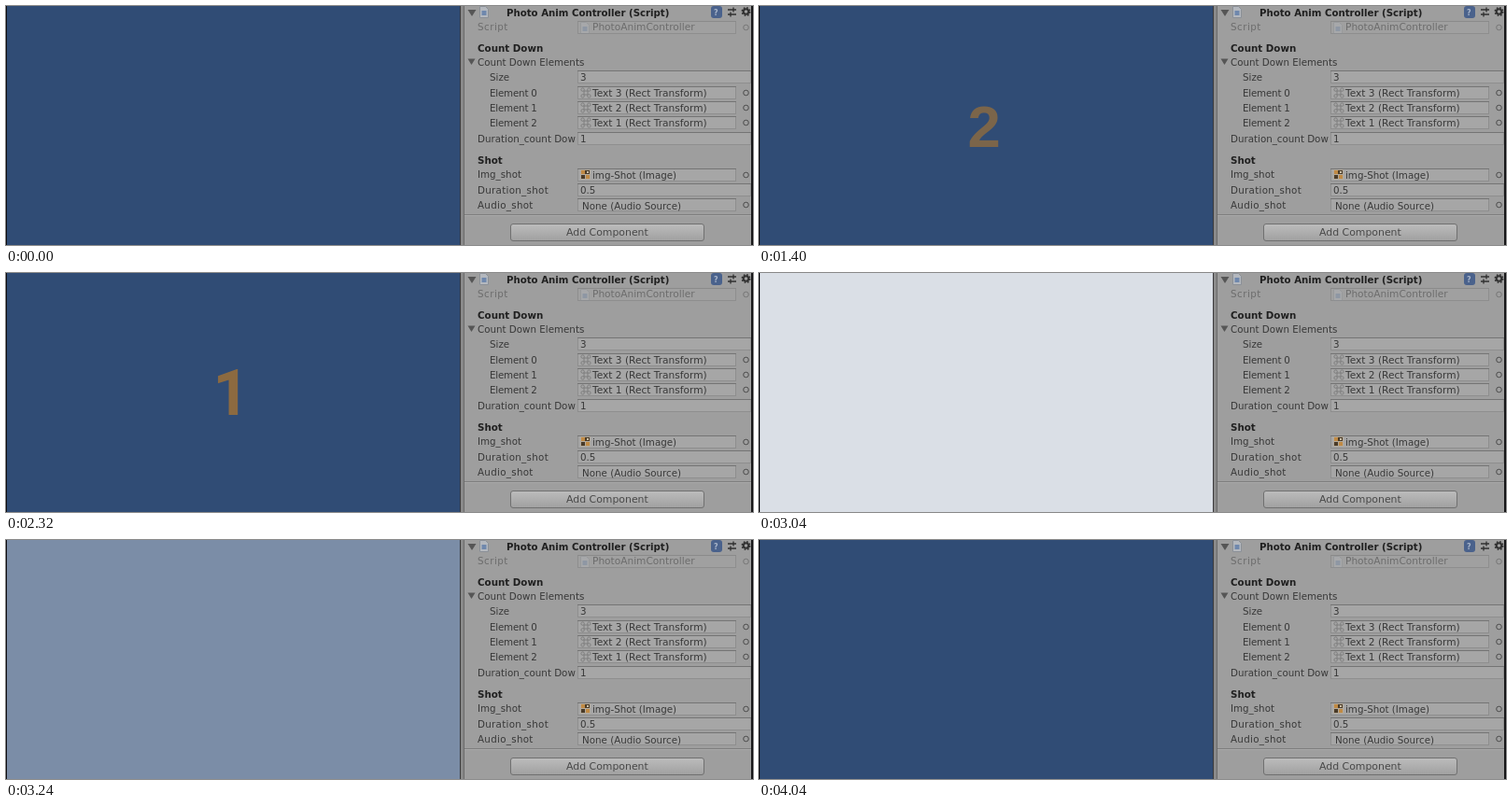
Animation, 800 px wide and 256 px high, one loop 4440 ms. Source, as an HTML page:

```html
<!DOCTYPE html>
<html lang="en">
<head>
<meta charset="utf-8">
<title>Photo countdown</title>
<style>
  html, body { margin: 0; width: 100%; height: 100%; overflow: hidden; background: #0c0c10; }
  svg { display: block; width: 800px; height: 256px; }
  text { font: 10.3px "DejaVu Sans", Verdana, sans-serif; fill: #383838; white-space: pre; }
  .bold { font-weight: bold; fill: #202020; }
  .dim { fill: #6c6c6c; }
  .wide { font-size: 10.6px; }
  #digit { font-weight: bold; fill: #ff9100; text-anchor: middle; }
</style>
</head>
<body>
<svg id="stage" viewBox="0 0 800 256">
  <defs>
    <linearGradient id="face" x2="0" y2="1">
      <stop stop-color="#bcbcbc"/><stop offset="1" stop-color="#a0a0a0"/>
    </linearGradient>
    <g id="rectIcon" fill="none" stroke="#7a7a7a" stroke-width=".9">
      <path d="M4 4h4v4h-4z"/>
      <circle cx="2.6" cy="2.6" r="1.7"/><circle cx="9.4" cy="2.6" r="1.7"/>
      <circle cx="2.6" cy="9.4" r="1.7"/><circle cx="9.4" cy="9.4" r="1.7"/>
    </g>
    <g id="page">
      <path d="M.5 .5h6l3 3v9h-9z" fill="#b4b8be" stroke="#8b9097"/>
      <rect x="2.500" y="5" width="5" height="5" fill="#6f88ad"/>
    </g>
  </defs>
  <rect x="1" width="486" height="256" fill="#304c75"/>
  <text id="digit" x="241"></text>
  <rect id="flash" x="1" width="485" height="256" fill="#fff" opacity="0"/>
  <rect x="486" width="1" height="256" fill="#3a3a3c"/>
  <rect x="487" width="3" height="256" fill="#8a8a8a"/>
  <rect x="490" width="308" height="256" fill="#9e9e9e"/>
  <rect x="490" width="1" height="256" fill="#6a6a6a"/>
  <path d="M491 223.5h307" stroke="#7e7e7e"/>
  <path d="M491 224.5h307" stroke="#a9a9a9"/>
  <g id="panel"></g>
</svg>
<script>
const NS = "http://www.w3.org/2000/svg";
const panel = document.getElementById("panel");
const digit = document.getElementById("digit");
const flash = document.getElementById("flash");

function add(tag, attrs, content) {
  const el = document.createElementNS(NS, tag);
  for (const key in attrs) el.setAttribute(key, attrs[key]);
  if (content) el.textContent = content;
  return panel.appendChild(el);
}

const label = (x, y, str, cls = "", style = "") => add("text", { x, y, class: cls, style }, str);
const icon = (id, x, y) => add("use", { href: "#" + id, x, y });

function field(y, right, faded) {
  const w = right - 612;
  add("rect", { x: 612.5, y: y + .5, width: w - 1, height: 13, fill: faded ? "#a0a0a0" : "#a6a6a6", stroke: "#8e8e8e" });
  add("path", { d: `M612 ${y + .5}h${w}`, stroke: faded ? "#8a8a8a" : "#747474" });
}

function picker(y, faded) {
  add("circle", { cx: 792.5, cy: y, r: 2.8, fill: "none", stroke: faded ? "#777" : "#4c4c4c" });
}

// Header
add("path", { d: "M494.5 4h9l-4.500 7z", fill: "#565656" });
icon("page", 507, 0);
label(536, 10.5, "Photo Anim Controller (Script)", "bold", "font-size:10.2px");
add("rect", { x: 755, y: 0, width: 12, height: 13, rx: 3, fill: "#4a628c" });
label(758, 10, "?", "bold", "font-size:8px;fill:#aab6ca");
add("path", { d: "M773 4h9M773 9h9M779 1.500v5M776 6.500v5", stroke: "#303030", "stroke-width": 1.3 });
add("circle", { cx: 792.5, cy: 6, r: 2.8, fill: "none", stroke: "#303030", "stroke-width": 2 });
add("circle", { cx: 792.5, cy: 6, r: 4.3, fill: "none", stroke: "#303030", "stroke-width": 1.4, "stroke-dasharray": "1.7 1.7" });

// Script reference
label(505, 25.5, "Script", "dim", "letter-spacing:.5px");
field(16, 782, true);
icon("page", 615, 17).setAttribute("opacity", .35);
label(628, 26, "PhotoAnimController", "dim wide");
picker(23, true);

// Countdown list
label(505, 49, "Count Down", "bold");
add("path", { d: "M494.500 56.500h8l-4 6.500z", fill: "#565656" });
label(505, 63.5, "Count Down Elements");
label(518, 80, "Size");
field(69, 798);
label(615, 80, "3");
for (let i = 0; i < 3; i++) {
  const y = 86 + 16.3 * i | 0;
  label(518, y + 10.5, "Element " + i, "", "letter-spacing:-.2px");
  field(y, 782);
  icon("rectIcon", 615, y + 1);
  label(628, y + 11, `Text ${3 - i} (Rect Transform)`, "wide");
  picker(y + 7);
}
label(505, 146, "Duration_count Dow");
field(135, 798);
label(615, 146, "1");

// Shot settings
label(505, 169, "Shot", "bold");
label(505, 184, "Img_shot");
field(174, 782);
add("rect", { x: 615, y: 175, width: 11, height: 11, fill: "#b3aa9c" });
add("path", { d: "M616 176h4v4h-4zM621 181h4v4h-4z", fill: "#c08a44" });
add("path", { d: "M620 176h5v4h-5zM616 181h4v4h-4z", fill: "#4a3b28" });
add("path", { d: "M622 177h2v2h-2z", fill: "#c9bda6" });
label(628, 185, "img-Shot (Image)");
picker(181);
label(505, 200.5, "Duration_shot", "", "letter-spacing:.3px");
field(190, 798);
label(615, 201, "0.5");
label(505, 216.5, "Audio_shot", "", "letter-spacing:.3px");
field(206, 782);
label(617, 217.5, "None (Audio Source)");
picker(213);

// Button
add("rect", { x: 540.5, y: 233.5, width: 207, height: 18, rx: 2.5, fill: "url(#face)", stroke: "#707070" });
label(600, 246, "Add Component", "", "font-size:10.9px;fill:#484848");

// Right edge
add("rect", { x: 798, y: 0, width: 2, height: 256, fill: "#161618" });

const LOOP = 4440, STEP = 40;
const SANS = '"Liberation Sans", Arial, sans-serif';
const COUNTS = [
  { char: "3", start: 20, font: SANS },
  { char: "2", start: 1000, font: SANS },
  { char: "1", start: 1990, font: "Roboto, sans-serif" }, // a 1 without a foot
];
const SHOT = { start: 2973, length: 540 };
const fade = (t, power) => t >= 0 && t < 1 ? (1 - t) ** power : 0;

function draw(time) {
  let alpha = 0;
  for (const { char, start, font } of COUNTS) {
    const t = (time - start) / 1000;
    if (t < 0 || t > .78) continue;
    const height = 58 - 54 * t ** 1.5;
    alpha = fade(t, 2);
    digit.textContent = char;
    digit.style.fontFamily = font;
    digit.style.fontSize = height / .7 + "px";
    digit.setAttribute("y", 128.5 + height / 2);
  }
  digit.setAttribute("opacity", alpha);
  flash.setAttribute("opacity", fade((time - SHOT.start) / SHOT.length, 1.5));
}

const origin = performance.now();
function tick() {
  const time = (performance.now() - origin) % LOOP;
  draw(Math.floor(time / STEP) * STEP);
  requestAnimationFrame(tick);
}
draw(0);
requestAnimationFrame(tick);
</script>
</body>
</html>
```
